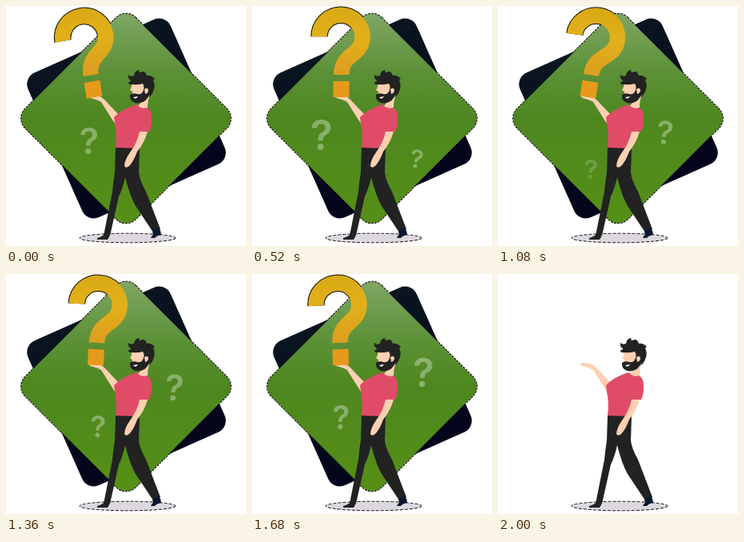
Recreate the animation shown at these times as an HTML page. Size 300 by 300 pixels, loop 2040 ms.

```html
<!DOCTYPE html>
<html lang="en">
<head>
<meta charset="utf-8">
<title>Man holding a question mark</title>
<style>
  html, body { margin: 0; width: 100%; height: 100%; overflow: hidden; background: #fff; }
  svg { display: block; width: 100vw; height: 100vh; }
  text { font: 600 10px Inter, "Liberation Sans", sans-serif; fill: #fff; text-anchor: middle; }
  .rim { fill: none; stroke: #0b0f08; stroke-width: 2; stroke-dasharray: 3 1; }
  .skin { fill: #fdd0b1; }
  .dark { fill: #222; }
</style>
</head>
<body>
<svg viewBox="0 0 300 300">
  <defs>
    <linearGradient id="green" x1="0" y1="0" x2="1" y2="1">
      <stop offset="0" stop-color="#82a868"/>
      <stop offset=".3" stop-color="#5b9035"/>
      <stop offset=".5" stop-color="#4e871f"/>
      <stop offset="1" stop-color="#569015"/>
    </linearGradient>
    <linearGradient id="navy" x1="0" y1="0" x2="0" y2="1">
      <stop offset="0" stop-color="#0a1520"/>
      <stop offset="1" stop-color="#03041b"/>
    </linearGradient>
    <linearGradient id="gold" gradientUnits="userSpaceOnUse" x1="0" y1="2" x2="0" y2="87">
      <stop offset="0" stop-color="#d8a915"/>
      <stop offset=".45" stop-color="#e3b01a"/>
      <stop offset="1" stop-color="#dc9c20"/>
    </linearGradient>
    <path id="hook" fill="none" d="M83.5 38.5A27 27 0 0 1 137.5 38C137.5 63 111.5 58 111.5 86"/>
    <rect id="back" x="53" y="41.5" width="195" height="198" rx="16" transform="rotate(-24 150.5 140.5)"/>
    <rect id="front" x="52.5" y="43" width="195" height="195" rx="17" transform="rotate(45 150 140.5)"/>
  </defs>

  <g class="scene">
    <use href="#hook" class="swing" stroke="#0b0f08" stroke-width="21.5"/>
    <use href="#front" class="rim"/>
    <use href="#back" fill="url(#navy)"/>
    <use href="#front" fill="url(#green)"/>
    <text id="left">?</text>
    <text id="right">?</text>
  </g>

  <ellipse cx="152" cy="290" rx="60" ry="5.8" fill="#ddd7df" stroke="#111" stroke-dasharray="4 2"/>

  <g id="man">
    <path class="skin" d="M140 135L123 117Q119 113 114 112Q106 110 103 112Q104 115 109 116Q116 118 119 120L136 147Z"/>
    <path class="dark" d="M137 177L167 177L166 208Q167 218 175 232L193 279L184 283L162 250Q155 238 149 214Q146 228 141 238L130 287L122 287L133 232Q134 220 136 208Z"/>
    <path class="dark" d="M114 290Q121 288 123 285L130 285Q129 290 127 292L114 292Z"/>
    <path fill="#0b1831" d="M183 282L191 277Q194 282 194 286Q188 287 186 290L181 290Q182 287 184 286Z"/>
    <path fill="#e04c68" d="M163 123Q170 127 176 127Q181 129 182 138Q183 148 179 157L167 157L167 178L137 177Q139 161 136 147L135 139Q144 129 163 123Z"/>
    <path class="skin" d="M167 157L177 157Q173 171 164 182Q160 193 155 199Q150 204 148 200Q148 193 155 183Q164 171 167 157Z"/>
    <path class="skin" d="M157 96L175 94L179 111Q174 117 176 127Q170 129 165 125L172 116L158 114L158 107L155 105Q158 101 157 96Z"/>
    <path class="dark" d="M158 98Q153 99 153 95Q156 95 156 93Q152 91 153 86Q156 89 160 87Q161 80 167 80Q165 83 168 83Q174 80 176 87Q181 86 186 91Q183 92 185 95Q187 101 183 109Q181 113 177 116Q170 123 161 121Q154 118 155 111Q159 108 164 110Q169 111 171 107Q174 102 171 97Q164 99 158 98Z"/>
    <path class="skin" d="M173 104Q177 101 178 105Q178 109 174 110ZM176 116L180 111Q177 118 177 127L169 127Q173 121 176 116Z"/>
    <path fill="#fff" d="M159 114L165 113Q162 118 159 114Z"/>
  </g>

  <g class="scene swing">
    <use href="#hook" stroke="url(#gold)" stroke-width="19.5"/>
    <rect x="101.5" y="94" width="20" height="20" fill="#e69a1c"/>
  </g>
</svg>
<script>
const LOOP = 2040, STEP = 40, HALF = LOOP / 2;

// Each small mark drifts along a cubic curve, growing as it goes.
const marks = [
  { id: "left", start: 920, life: 2020, xs: [116, 119, 103, 70], ys: [212, 175, 158, 159], size: 23, grow: 19, tilt: 0 },
  { id: "right", start: 160, life: 1840, xs: [202, 212, 204, 221], ys: [212, 176, 140, 104], size: 19, grow: 21, tilt: 10 }
];

const bezier = ([a, b, c, d], p) => {
  const q = 1 - p;
  return a * q ** 3 + 3 * b * p * q * q + 3 * c * p * p * q + d * p ** 3;
};

function drift(m, t) {
  const p = ((t - m.start + LOOP) % LOOP) / m.life;
  const el = document.getElementById(m.id);
  const fade = Math.max(0, Math.min(1, p / .15, (1 - p) / .17));
  const scale = (m.size + m.grow * p) / 7.4;
  el.setAttribute("opacity", .33 * fade);
  el.setAttribute("transform",
    `translate(${bezier(m.xs, p)} ${bezier(m.ys, p)}) rotate(${m.tilt * (1 - p)}) scale(${scale}) translate(0 3.7)`);
}

function setAll(selector, name, value) {
  for (const el of document.querySelectorAll(selector)) el.setAttribute(name, value);
}

function draw(now) {
  const t = Math.floor((now % LOOP) / STEP) * STEP;
  const swing = 1 - Math.abs(t - HALF) / HALF;
  setAll(".swing", "transform", `rotate(${-9 + 18.5 * swing} 111.5 120)`);
  for (const m of marks) drift(m, t);
  setAll(".scene", "visibility", t < LOOP - STEP ? "visible" : "hidden");
}

const start = performance.now();
function tick() {
  draw(performance.now() - start);
  requestAnimationFrame(tick);
}
tick();
</script>
</body>
</html>
```
